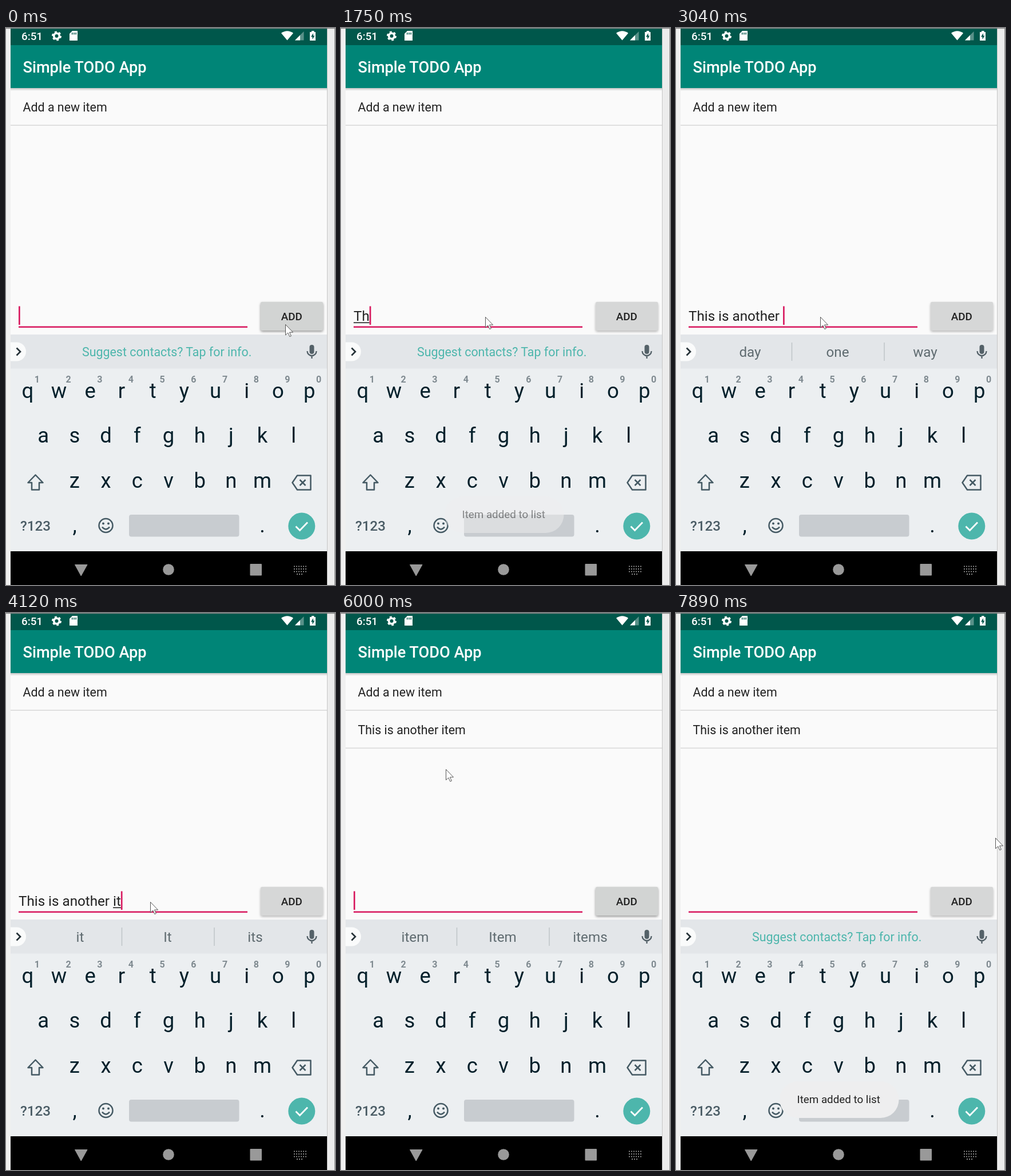
Recreate the animation shown at these times as an HTML page. Size 575x974 px, loop 8000 ms.

```html
<!DOCTYPE html>
<html lang="en">
<head>
<meta charset="utf-8">
<title>Simple TODO App</title>
<style>
  html, body { margin: 0; width: 100%; height: 100%; overflow: hidden; background: #f0f0f0; }
  svg { display: block; width: 100vw; height: 100vh; font-family: Roboto, sans-serif; }
  text { white-space: pre; }
  .mid { text-anchor: middle; }
  .medium { font-weight: 500; }
  .item { font-size: 21.4px; fill: #212121; }
  .key { font-size: 36.5px; fill: #04202b; }
  .hint { font-size: 16px; font-weight: 700; fill: #7f8a90; }
  .word { font-size: 24.2px; fill: #5f6b70; }
  .line { fill: none; stroke: #455a64; stroke-width: 2.5; }
</style>
</head>
<body>
<svg viewBox="0 0 575 974">
  <defs>
    <filter id="soft" x="-20%" y="-40%" width="140%" height="190%"><feGaussianBlur stdDeviation="2"/></filter>
    <linearGradient id="barShade" x2="0" y2="1">
      <stop stop-color="#000" stop-opacity=".22"/>
      <stop offset="1" stop-color="#000" stop-opacity="0"/>
    </linearGradient>
  </defs>

  <rect width="575" height="974" fill="#f0f0f0"/>
  <rect x="8" width="553" height="974" fill="#fafafa"/>
  <rect x="561" width="14" height="974" fill="#ececec"/>
  <rect x="561" width="1" height="974" fill="#c6c6c6"/>
  <rect x="574" width="1" height="974" fill="#8c8c8c"/>

  <!-- status and title bars -->
  <rect x="8" y="30" width="553" height="75" fill="#008577"/>
  <rect x="8" y="105" width="553" height="5" fill="url(#barShade)"/>
  <rect x="8" width="553" height="30" fill="#00574b"/>
  <rect width="575" height="1.2" fill="#858585"/>
  <g fill="#fff">
    <text class="medium" x="27" y="21" font-size="18.8">6:51</text>
    <circle cx="88.5" cy="14" r="4.8" fill="none" stroke="#fff" stroke-width="3.6"/>
    <circle cx="88.5" cy="14" r="7.2" fill="none" stroke="#fff" stroke-width="2.6" stroke-dasharray="3.77"/>
    <path d="M116 5h9v17h-14V10z" stroke-linejoin="round"/>
    <path d="M115.7 8v3.5M119 8v3.5M122.2 8v3.5" stroke="#00574b" stroke-width="1.5"/>
    <path d="M481 9q10.500-7.500 21 0L491.500 21.500z"/>
    <path d="M505 21.500L520.500 6v15.500z" opacity=".35"/>
    <path d="M505 21.500L514 12.500v9z"/>
    <path d="M534 5h4.500v2h2.500v15h-10V7h3z"/>
    <path d="M537 9l-4 6.500h2.500V20l4-6.500H537z" fill="#00574b"/>
    <text class="medium" x="29.5" y="78" font-size="27.2">Simple TODO App</text>
  </g>

  <!-- list -->
  <text class="item" x="29.5" y="146">Add a new item</text>
  <rect x="8" y="169.300" width="553" height="1.600" fill="#dadada"/>
  <g id="newRow">
    <text class="item" x="29.5" y="212">This is another item</text>
    <rect x="8" y="235.500" width="553" height="1.600" fill="#dadada"/>
  </g>

  <!-- input -->
  <rect x="22" y="521.500" width="400" height="2.600" fill="#d81b60"/>
  <text id="field" x="22" y="512" font-size="24.2" fill="#212121"></text>
  <rect id="underline" y="514.500" height="1.600" fill="#212121"/>
  <rect id="caret" y="486.500" width="2.700" height="32.500" fill="#d81b60"/>
  <rect id="buttonShade" x="445" y="481" width="109" height="50" rx="3" filter="url(#soft)"/>
  <rect id="button" x="445" y="479" width="109" height="50" rx="2.5"/>
  <text class="mid medium" x="499.2" y="511" font-size="18.8" fill="#212121">ADD</text>

  <!-- suggestion strip -->
  <rect x="8" y="536" width="553" height="60" fill="#e3e6e9"/>
  <path d="M8 549.500h10.500a16.500 16.500 0 0 1 0 33H8z" fill="#fafbfb"/>
  <path d="M18.500 559.500l6.500 6.500-6.500 6.500" fill="none" stroke="#263238" stroke-width="2.7"/>
  <g fill="#546168">
    <rect x="530.5" y="554" width="8" height="16" rx="4"/>
    <path d="M526.500 565a8 8 0 0 0 16 0M534.500 573v5" fill="none" stroke="#546168" stroke-width="2.3"/>
  </g>
  <text id="prompt" x="133" y="574" font-size="21.4" fill="#4db6ac">Suggest contacts? Tap for info.</text>
  <g id="words">
    <path d="M202.500 550v32M364 550v32" stroke="#bcc2c5" stroke-width="1.4"/>
  </g>

  <!-- keyboard -->
  <rect x="8" y="595.5" width="553" height="320" fill="#eceff1"/>
  <g id="keys"></g>
  <path class="line" d="M51.500 781.500L38.500 795h6.500v12.500h13V795h6.500z" stroke-linejoin="round"/>
  <path class="line" d="M509 782.500h23.500v25H509l-8.500-12.500zM513.500 790l10 10M523.500 790l-10 10" stroke-linejoin="round"/>
  <text class="medium" x="25" y="879" font-size="24.2" fill="#4a5c65">?123</text>
  <circle class="line" cx="174.5" cy="870" r="12"/>
  <path class="line" d="M168 872.500q6.500 8 13 0"/>
  <g fill="#455a64"><circle cx="170" cy="866.5" r="2"/><circle cx="179" cy="866.5" r="2"/></g>
  <rect x="215" y="851" width="192.5" height="38.5" rx="4" fill="#c8ccd0"/>
  <circle cx="516.8" cy="871" r="23.5" fill="#4db6ac"/>
  <path d="M506.500 871.500l7 7 13.500-14" fill="none" stroke="#fff" stroke-width="2.8"/>

  <!-- navigation bar -->
  <rect x="8" y="915" width="553" height="59"/>
  <g fill="#999">
    <path d="M120.500 938.500h21.500L131.200 958z" stroke="#999" stroke-linejoin="round"/>
    <circle cx="284" cy="947" r="9.8"/>
    <rect x="426.5" y="937" width="20.5" height="20.5" rx="1"/>
    <path d="M503 941.500h22M503 946h22M503 950.500h22M508 955h12" stroke="#888" stroke-width="1.9" stroke-dasharray="2 2"/>
  </g>

  <g id="toast">
    <rect x="181" y="819" width="208.5" height="64" rx="32" fill="#eeeeef"/>
    <text class="mid" x="284.2" y="857" font-size="18.8" fill="#222">Item added to list</text>
  </g>
  <path id="pointer" d="M.5.5v18.500l4.300-4 3 6.600 2.600-1.100-2.900-6.400h6z" fill="#fff" stroke="#444" stroke-width=".9"/>
</svg>
<script>
const LOOP = 8000, ADDED = 5760;
const SENTENCE = 'This is another item';

// Key points: time in ms, then the values reached; linear in between.
const typedCount = [[0, 0], [1600, 1], [2140, 5], [2530, 11], [3040, 16], [3970, 17], [4270, 20]];
const pointerPath = [[150, 488, 518], [390, 335, 546], [660, 272, 532], [900, 252, 505], [4830, 252, 505],
  [5250, 438, 487], [5490, 455, 495], [ADDED, 455, 495], [6000, 183, 273], [6150, 184, 300],
  [6500, 180, 297], [6960, 198, 206], [7570, 198, 201], [7890, 558, 393]];

// Spans of input activity; the caret stays lit in them and blinks afterwards.
const activity = [[-250, -250], [1600, 3200], [3970, 4250], [ADDED, 5920]];

const predictions = {
  'This ': ['is', 'morning', 'weekend'],
  'ano': ['ano', 'another', 'about'],
  'another ': ['day', 'one', 'way'],
};

const $ = id => document.getElementById(id);
const set = (el, attrs) => { for (const k in attrs) el.setAttribute(k, attrs[k]); };
const show = (el, on) => el.style.display = on ? '' : 'none';
const ramp = (t, from, to) => Math.min(1, Math.max(0, (t - from) / (to - from)));

function along(points, t) {
  const next = points.findIndex(([time]) => time > t);
  if (next < 0) return points.at(-1).slice(1);
  const b = points[next], a = points[next - 1] ?? b;
  const k = a === b ? 0 : ramp(t, a[0], b[0]);
  return a.slice(1).map((v, i) => v + (b[i + 1] - v) * k);
}

const typedText = t => SENTENCE.slice(0, Math.floor(along(typedCount, t)[0]));

function suggest(text) {
  const word = text.match(/\S*\s?$/)[0];
  return predictions[word] ?? [word, word.charAt(0).toUpperCase() + word.slice(1), word + 's'];
}

function caretLit(t) {
  const [, end] = activity.findLast(([start]) => start <= t);
  return t < end || (t - end) % 1000 < 500;
}

const pen = document.createElement('canvas').getContext('2d');
pen.font = '24.2px Roboto, sans-serif';
const endX = text => 22 + pen.measureText(text).width;

function addText(parent, cls, x, y, content = '') {
  const el = document.createElementNS('http://www.w3.org/2000/svg', 'text');
  set(el, { class: cls + ' mid', x, y });
  el.textContent = content;
  parent.append(el);
  return el;
}

['qwertyuiop', 'asdfghjkl', 'zxcvbnm'].forEach((row, r) => {
  const left = 284 - 54.7 * (row.length - 1) / 2;
  [...row].forEach((letter, i) => {
    const x = left + 54.7 * i;
    addText($('keys'), 'key', x, 646.5 + 78.5 * r, letter);
    if (r === 0) addText($('keys'), 'hint', x + 16.5, 620, (i + 1) % 10);
  });
});
addText($('keys'), 'key', 120, 882, ',');
addText($('keys'), 'key', 448, 882, '.');

const wordSlots = [0, 1, 2].map(i => addText($('words'), 'word', 129.5 + 153 * i, 575));

function render(t) {
  const text = t < ADDED ? typedText(t) : '';
  const wordStart = endX(text.slice(0, text.lastIndexOf(' ') + 1));
  const end = endX(text);
  $('field').textContent = text;
  set($('underline'), { x: wordStart, width: end - wordStart });
  set($('caret'), { x: end });
  show($('caret'), caretLit(t));

  const suggesting = t >= 1900 && t < 6420;
  show($('prompt'), !suggesting);
  show($('words'), suggesting);
  suggest(typedText(t)).forEach((word, i) => wordSlots[i].textContent = word);

  const raised = t < 270 || (t >= ADDED && t < 6300);
  set($('button'), { fill: raised ? '#d2d4d3' : '#d6d7d7' });
  set($('buttonShade'), { opacity: raised ? .4 : .28 });

  show($('newRow'), t >= ADDED);
  set($('toast'), { opacity: ramp(t, 200, 600) - ramp(t, 1500, 2000) + ramp(t, 6230, 6630) });

  show($('pointer'), t < 7570 || t >= 7770);
  set($('pointer'), { transform: `translate(${along(pointerPath, t).map(Math.round)})` });
}

const begin = performance.now();
function tick() {
  render((performance.now() - begin) % LOOP);
  requestAnimationFrame(tick);
}
tick();
</script>
</body>
</html>
```
